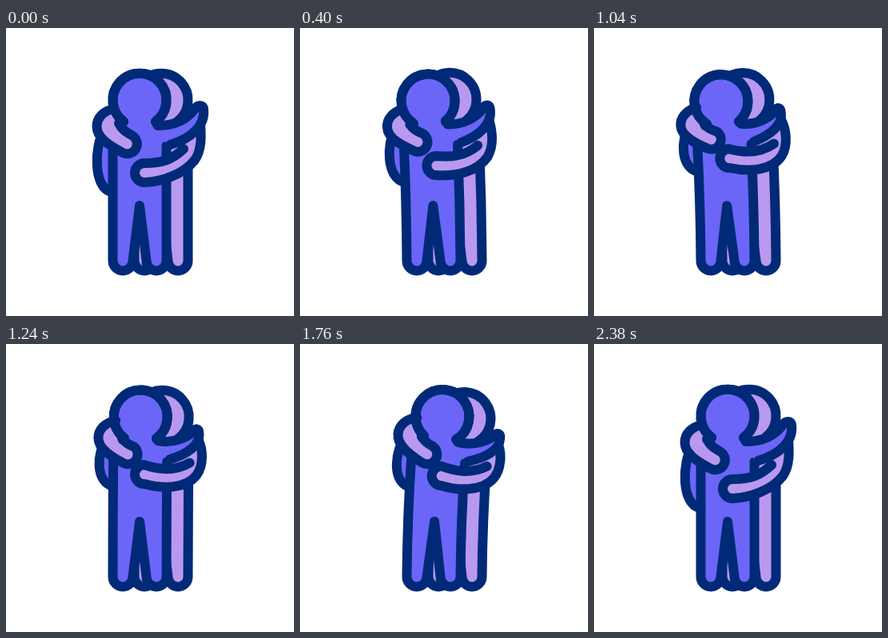
An HTML page with a canvas for the animation above (2400 ms loop, 360 px wide and 360 px high).

```html
<!DOCTYPE html>
<html lang="en">
<head>
<meta charset="utf-8">
<title>Hug</title>
<style>
  html, body { margin: 0; height: 100%; overflow: hidden; background: #fff; }
  canvas { display: block; width: 360px; height: 360px; }
</style>
</head>
<body>
<canvas width="360" height="360"></canvas>
<script>
const ctx = document.querySelector('canvas').getContext('2d');
const LOOP = 2400, STEP = LOOP / 3;
const INK = '#002a78', BLUE = '#6b66f8', PINK = '#b999ef';
const LEFT = -14.2, RIGHT = 12.6, BEND = 2.2;

// Each point is "x,y", or "x,y>x,y" when it moves from the loose to the tight hug.
const SIDES = 'M200.5,147 C200.5,196 200.5,244 200.5,291 A12.5 12.5 0 0 1 175.5,291 L167,222 ' +
  'L158.5,291 A12.5 12.5 0 0 1 133.5,291 C133.5,244 133.5,190 133.5,142';
const HEAD = 'M144,121>145,120 L147,117>147,118 A33.5 33.5 0 1 1 187,117>187,118 L190,122>190,121';
const BACK_ARM = 'M122,130>125,120 C111,145>112.5,135 108,200>111,173 132,205>133,178';
const LEFT_ARM = 'M134,101>136,96 C122,104>122,99 113.5,112>114.5,108 113.5,123>114.5,118 ' +
  'C113.5,138>114.5,131 130,147>130,141 146,156>147,149.5 A12.2 12.2 0 0 0 157,134>159,128.5 ' +
  'C150,130>152,126 145,127>147,122 141,119>144,118';
const RIGHT_ARM = 'M243,120>240,120 C244,135>245,130 245,152>247,150 236,165>238,163 ' +
  'C222,183>225,181 195,192>195,181 173,193>173,175 A12 12 0 0 1 173,169>172,151 ' +
  'C195,169>185,155 207,165>207,161 222,151>229,148';
const FRONT_ARM = 'M190,122>190,121 C208,122>208,124 225,116>224,117 236,101>233,109 ' +
  'C239,96>236,104 247,95>240.5,104 247,102>240.5,112 C249,122>241,126 232,138>226,137 205,146>204,144';

const clamp = v => Math.min(1, Math.max(0, v));
const ease = p => p * p * (3 - 2 * p);
const mix = (a, b, p) => a + (b - a) * p;

function draw(t) {
  const [lean, swing, settle] = [0, 1, 2].map(i => ease(clamp(t / STEP - i)));
  const sway = mix(mix(LEFT * lean, RIGHT, swing), 0, settle);
  const squeeze = lean - settle;

  // Bends the figure sideways above the fixed feet.
  const pose = (path, shift = 0) => path.replace(
    /([\d.]+),([\d.]+)(?:>([\d.]+),([\d.]+))?/g,
    (_, x0, y0, x1 = x0, y1 = y0) => {
      const x = mix(+x0, +x1, squeeze) + shift;
      const y = mix(+y0, +y1, squeeze);
      const h = Math.max(0, (291 - y) / 200);
      const slope = sway * BEND / 200 * h ** (BEND - 1);
      const px = x + sway * h ** BEND;
      const py = y + (x - 173) * slope;
      return px.toFixed(2) + ',' + py.toFixed(2);
    });
  const fill = (d, color) => {
    ctx.fillStyle = color;
    ctx.fill(new Path2D(d));
  };
  const stroke = d => ctx.stroke(new Path2D(d));
  const limb = (path, color, close = '') => {
    fill(pose(path + close), color);
    stroke(pose(path));
  };
  const body = (color, shift) => {
    const sides = pose(SIDES, shift), head = pose(HEAD, shift);
    fill(sides + head.replace('M', 'L'), color);
    stroke(sides + head);
  };

  ctx.clearRect(0, 0, 360, 360);
  ctx.lineWidth = 12;
  ctx.lineCap = ctx.lineJoin = 'round';
  ctx.strokeStyle = INK;

  limb(BACK_ARM, BLUE, ' L135,135');
  body(PINK, 27);
  body(BLUE, 0);
  limb(LEFT_ARM, PINK);
  stroke(pose(HEAD));
  limb(RIGHT_ARM, PINK, ' L208,147');
  limb(FRONT_ARM, BLUE, ' L185,135');
}

function tick() {
  draw(performance.now() % LOOP);
  requestAnimationFrame(tick);
}
tick();
</script>
</body>
</html>
```
